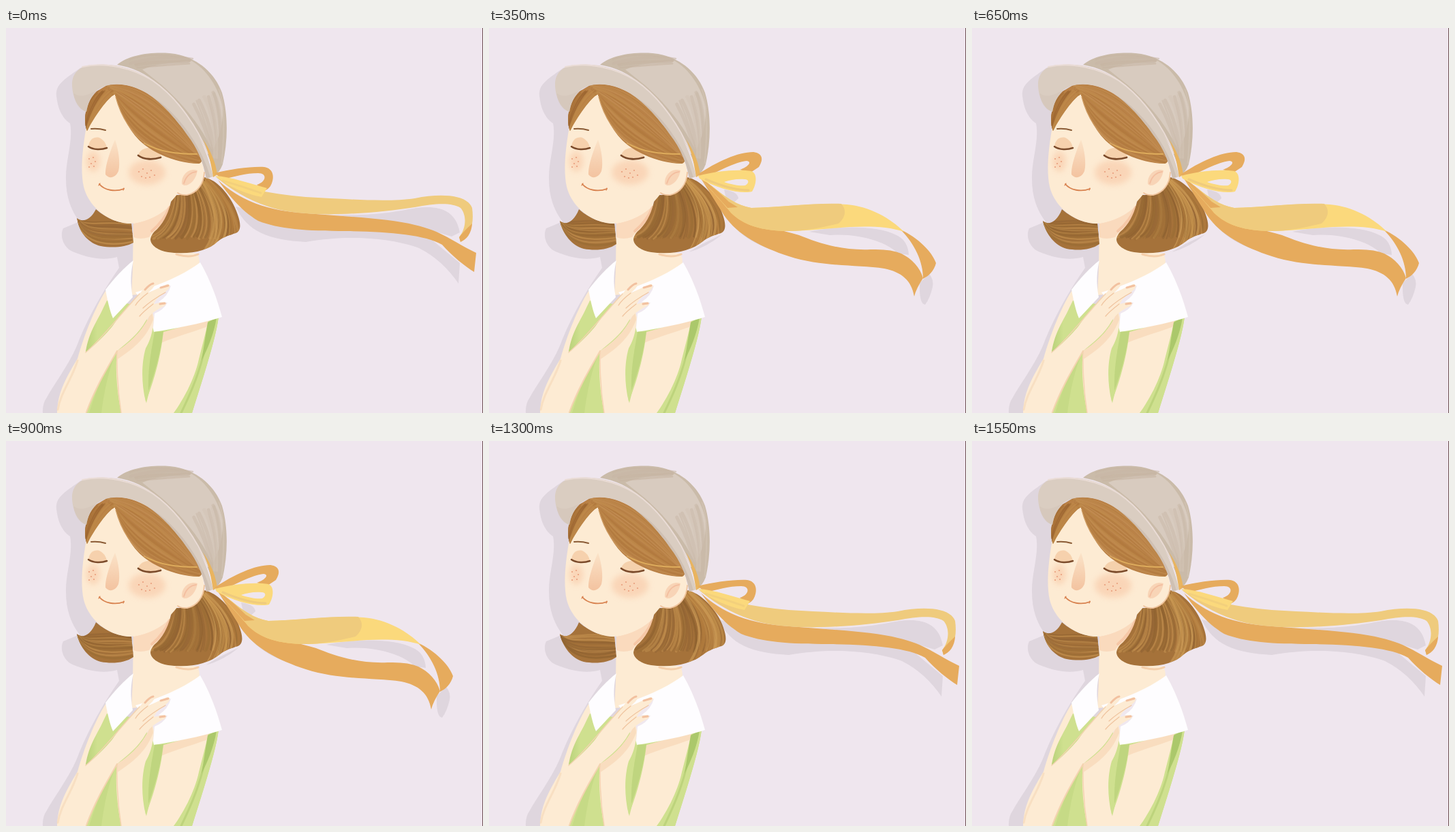
These frames come from a looping animation (700x565 px, 1600 ms). An HTML page:

```html
<!DOCTYPE html>
<html lang="en">
<head>
<meta charset="utf-8">
<title>Girl in the breeze</title>
<style>
html, body { margin: 0; width: 100%; height: 100%; overflow: hidden; background: #efe6ee; }
svg { display: block; width: 700px; height: 565px; }
.pose { display: none; }
</style>
</head>
<body>
<svg id="stage" viewBox="0 0 700 565"></svg>
<script>
const shape = (d, fill, extra = '') => `<path d="${d}" fill="${fill}" ${extra}/>`;
const line = (d, color, width = 1.5, extra = '') =>
  `<path d="${d}" fill="none" stroke="${color}" stroke-width="${width}" stroke-linecap="round" ${extra}/>`;
const blob = (x, y, rx, ry, fill, opacity = 1) =>
  `<ellipse cx="${x}" cy="${y}" rx="${rx}" ry="${ry}" fill="${fill}" opacity="${opacity}" filter="url(#soft)"/>`;

function random(seed) {
  return () => (seed = (seed * 16807) % 2147483647) / 2147483647;
}

// Brush strokes spread between two cubic curves.
function strands(count, a, b, colors, seed, width = 2.2) {
  const rnd = random(seed);
  let out = '';
  for (let i = 0; i < count; i++) {
    const k = (i + rnd()) / count;
    const p = a.map((v, j) => (v + (b[j] - v) * k + (rnd() - .5) * 4).toFixed(1));
    const color = colors[Math.floor(rnd() * colors.length)];
    out += line(`M${p[0]} ${p[1]}C${p.slice(2)}`, color, (width * (.5 + rnd())).toFixed(1), 'opacity=".55"');
  }
  return out;
}

function clipped(id, d, fill, inner) {
  return `<clipPath id="${id}"><path d="${d}"/></clipPath>` + shape(d, fill) +
    `<g clip-path="url(#${id})">${inner}</g>`;
}

const SKIN = '#fdebd3', PEACH = '#f5cfab', SHADE = '#dfd6de', LID = '#f4cda6';
const GREEN = '#cfe08f', LEAF = '#abc86b';
const ORANGE = '#e6ab5d', GOLD = '#efcb7d', YELLOW = '#fbd97c';
const BROWNS = ['#8b5f2f', '#c4914f', '#9c6d36', '#c99653', '#916333'];
const LIGHTS = ['#c8954f', '#d3a25c', '#b57f3f'];

const defs = `<defs>
  <filter id="soft" x="-50%" y="-50%" width="200%" height="200%"><feGaussianBlur stdDeviation="4"/></filter>
  <linearGradient id="nose" x1="0" y1="0" x2="0" y2="1">
    <stop offset="0" stop-color="#f3c29d" stop-opacity=".2"/><stop offset="1" stop-color="#f3c3a0"/>
  </linearGradient>
  <linearGradient id="green" x1="0" y1="0" x2="1" y2="0">
    <stop offset="0" stop-color="#b9d27a"/><stop offset=".4" stop-color="${GREEN}"/>
  </linearGradient>
</defs>`;

const backdrop =
  shape('M110 58C88 74 72 82 74 100C76 118 82 132 94 140C99 165 87 195 88 222C88 250 97 270 108 284L84 294C78 306 85 324 100 329C125 339 145 341 163 336L166 352C145 382 124 418 108 456C96 490 72 520 60 542Q53 552 54 565H130L200 420L230 120Z', SHADE);

const body =
  shape('M146 386C130 412 115 450 105 485C90 510 75 535 75 565H117L135 480L165 405Z', SKIN) +
  shape('M148 400L312 424C308 455 292 505 273 565H110Q114 520 117 474C124 450 136 425 148 400Z', GREEN) +
  shape('M148 402C137 425 121 445 117 476L160 440Z', 'url(#green)') +
  shape('M163 474C150 500 143 540 140 565H122C134 525 147 500 163 474Z', LEAF, 'opacity=".25"') +
  // shoulder arm and the forearm behind
  shape('M229 447L306 424C299 445 293 472 285 490C275 525 260 548 250 565H203C206 545 221 500 229 447Z', SKIN) +
  shape('M229 447L306 424L299 437C275 446 252 452 228 462Z', PEACH, 'opacity=".5"') +
  shape('M297 430L312 424C308 455 293 500 273 565H246C264 540 278 510 283 486C288 466 293 447 297 430Z', GREEN) +
  shape('M296 432L309 425C305 450 295 472 287 488Z', LEAF) +
  line('M290 478C282 512 268 542 257 565', LEAF, 3, 'opacity=".5"') +
  // neck and chest
  shape('M187 280L186 350L184 392L204 390L283 350C285 340 283 334 280 331L240 325L241 250Z', SKIN) +
  shape('M187 287C210 283 229 273 240 261L238 285C224 292 214 300 210 307Q196 311 187 307Z', '#fadabd') +
  line('M240 263C235 276 226 288 214 298', '#efaa82', 4, 'opacity=".4"') +
  line('M250 332Q269 338 282 332', PEACH, 3) +
  // collar
  shape('M187 341C174 351 158 368 146 384C149 400 152 414 157 426L186 395C182 374 183 358 187 341Z', '#fefdff') +
  shape('M285 344C300 370 310 398 317 424C290 433 255 440 217 446L208 410L190 388C225 377 258 364 285 344Z', '#fefdff') +
  shape('M209 388L242 378Q238 393 224 402L237 403Q231 414 218 419L216 440L207 430Z', '#f0e8ef') +
  // crossed forearms and hand
  shape('M163 474C185 460 205 440 214 413L217 425C216 440 214 450 210 460C201 485 199 520 205 547L210 565H169C163 535 160 500 163 474Z', SKIN) +
  shape('M163 474C185 460 205 440 214 413L216 428C205 458 184 472 164 486Z', PEACH, 'opacity=".5"') +
  shape('M216 446L231 445C228 480 216 522 205 548C198 520 199 490 205 470Q212 458 216 446Z', GREEN) +
  shape('M218 446L231 445C227 475 219 505 209 532C208 500 213 475 218 446Z', LEAF, 'opacity=".45"') +
  shape('M75 565C75 535 103 508 117 476C133 463 147 449 156 438C168 420 185 402 196 390C203 381 210 374 217 374C221 378 213 384 208 389L236 376C243 376 241 382 234 387C226 393 220 398 217 405L230 402C237 402 236 407 230 409C218 415 212 420 205 430C195 448 180 460 163 474C148 500 128 535 117 565Z', SKIN) +
  line('M105 488C97 515 80 535 76 560', '#f6d8b8', 3, 'opacity=".6"') +
  line('M163 474C148 500 130 530 118 564', '#f4d3b0', 2) +
  line('M117 476C137 460 168 420 196 390', '#f4d3b0', 1.5) +
  line('M163 474Q162 520 169 565', '#f4d3b0', 1.5) +
  line('M216 405C207 412 200 418 196 423M208 389C200 395 194 400 190 407M234 388Q214 399 201 411', '#f0c5a0', 1.3) +
  line('M204 384Q211 376 216 375M227 381L238 378M226 405L233 404', '#eeb08a', 3, 'opacity=".7"');

const bangs = 'M148 84C190 74 245 108 287 191C288 195 286 199 283 199C255 199 224 187 204 172C183 156 169 128 160 97C149 103 131 128 119 151C111 131 120 105 133 93Z';

const freckles = [[122, 192], [128, 190], [125, 199], [131, 196], [122, 204], [129, 203], [195, 211],
  [201, 207], [207, 213], [213, 209], [199, 218], [205, 220], [218, 216], [211, 219]]
  .map(([x, y]) => `<circle cx="${x}" cy="${y}" r="1.1" fill="#e99e7c"/>`).join('');

const head =
  shape('M150 90C130 105 119 125 117 150C112 180 109 210 114 233C121 262 150 286 182 287C213 285 236 264 252 243L290 205L270 150L200 90Z', SKIN) +
  // ear
  shape('M250 211C258 197 281 192 289 204C296 221 284 242 266 245Q252 245 249 236Z', SKIN) +
  line('M291 212C290 230 280 242 266 245Q257 246 252 242', '#f0c49d', 1.8) +
  shape('M258 229C257 214 270 205 281 209C279 222 270 232 261 231Z', '#f8d4b6') +
  line('M261 228C265 215 272 212 279 211', '#f3bfa0', 2) +
  // cheeks and eyelids
  blob(128, 196, 10, 15, '#f8c7a5', .6) + blob(207, 212, 27, 18, '#f8c7a5', .6) +
  shape('M121 174C122 163 130 159 137 161Q146 165 148 176C140 179 128 179 121 174Z', LID, 'opacity=".85"') +
  shape('M194 187C196 178 207 174 215 177Q226 181 228 190C217 193 203 194 194 187Z', LID, 'opacity=".85"') +
  shape('M160 164C165 178 168 198 165 210C161 220 151 222 146 215C145 203 153 180 160 164Z', 'url(#nose)') +
  freckles +
  line('M125 148Q136 147 146 150', '#8a5b35', 2) +
  line('M121 174C128 179 140 179 148 176', '#7b4b2b', 2.6) +
  line('M194 187C203 194 217 193 227 190', '#7b4b2b', 2.8) +
  line('M137 229C144 238 160 241 173 236', '#d8824f', 1.8) +
  line('M136 231l2 -3M172 238l1 -3', '#d8824f', 1.3) +
  clipped('fringe', bangs, '#b98045',
    strands(30, [149, 85, 195, 82, 245, 115, 286, 190], [158, 96, 168, 145, 210, 185, 282, 197],
      ['#ad7539', '#c6925a', '#bf8a4c', '#b37b40', '#c48f52'], 17, 3) +
    strands(9, [133, 94, 119, 107, 114, 130, 117, 150], [158, 93, 145, 102, 130, 124, 119, 148],
      ['#a36c33', '#bf8a4a', '#955f2c'], 29, 3)) +
  line('M203 169C225 182 251 185 280 185', '#dfad5d', 2) +
  line('M161 101C169 132 187 158 207 171', '#cd9a60', 1.2) +
  // hat
  shape('M163 54C180 40 210 35 240 37C275 40 305 62 317 95C326 125 326 165 318 200Q313 213 306 215C296 175 265 120 225 84C205 66 185 58 163 54Z', '#cabba9') +
  shape('M200 61C225 50 254 52 270 47C295 60 312 88 318 116C319 138 314 160 303 180C289 150 268 119 229 84Z', '#d8cbbf') +
  strands(9, [276, 110, 285, 130, 294, 155, 302, 184], [313, 90, 320, 110, 323, 140, 316, 197],
    ['#cabba9', '#d3c5b7', '#c8b8a6'], 41, 4) +
  strands(9, [180, 48, 205, 38, 240, 39, 272, 47], [194, 59, 220, 55, 245, 55, 268, 51],
    ['#cabba9', '#c6b5a3', '#d0c2b3'], 53, 3) +
  shape('M118 123C106 119 98 103 97 85C96 65 110 54 130 54C160 51 190 60 214 75C255 103 289 155 304 218L294 221C290 198 281 176 266 157C240 120 215 97 191 88C169 80 144 81 132 93C124 101 120 112 118 123Z', '#dacdc1') +
  shape('M118 123C106 119 101 109 99 95C111 105 121 96 132 93C124 101 120 112 118 123Z', '#cfc0b3', 'opacity=".4"') +
  shape('M191 88C240 108 283 162 300 219L294 221C290 198 281 176 266 157C240 120 215 97 191 88Z', '#c8b8aa', 'opacity=".6"') +
  line('M112 57C145 49 187 59 215 77C253 103 282 148 296 184', '#eadcd6', 2) +
  shape('M289 163C300 179 308 198 310 215L304 219C301 199 297 180 289 163Z', '#e9b45f');

function hair(id, right, tip, seed) {
  const r = n => n + right;
  const drop = tip - 279;
  const bob = `M290 219C311 222 ${r(332)} 249 ${r(340)} 274C${r(345)} 288 ${r(345)} 298 ${r(337)} 301C${r(328)} 304 ${r(320)} 306 ${r(311)} 313C296 328 268 333 238 329C224 327 212 319 212 310Q213 302 222 295C236 280 241 263 244 245C267 247 287 238 290 219Z`;
  const flick = `M104 ${tip}C112 ${tip + 7} 124 ${tip + 3} 132 266C149 281 168 287 184 287L187 ${315 + drop / 2}C175 ${322 + drop} 155 ${323 + drop} 139 ${320 + drop}C122 ${316 + drop} 108 302 104 ${tip}Z`;
  return clipped('flick' + id, flick, '#a5723a',
      strands(18, [105, tip, 120, 292, 145, 277, 185, 288], [106, 290, 118, 318, 150, 326, 186, 316], BROWNS, seed + 5)) +
    clipped('bob' + id, bob, '#a5723a',
      strands(42, [250, 240, 246, 275, 234, 300, 212, 308], [296, 221, r(325), 245, r(340), 278, r(340), 307],
        BROWNS, seed, 3) +
      strands(12, [288, 226, r(310), 265, r(310), 295, r(290), 326], [296, 221, r(330), 250, r(345), 280, r(338), 303],
        LIGHTS, seed + 11, 3));
}

const raised = {
  shade:
    shape('M337 262C354 299 385 311 440 314C510 302 570 310 606 323Q640 340 664 375L666 345L600 290L370 270Z', SHADE) +
    shape('M480 274C540 276 570 270 602 264C636 260 660 267 666 300L654 306L600 290L520 279Z', SHADE),
  cloth:
    shape('M311 223C345 255 385 267 430 271C500 277 560 279 600 289C640 298 655 313 690 330L687 358C674 350 655 335 640 318C615 303 560 299 500 298C440 298 400 295 370 283C345 268 328 247 311 223Z', ORANGE) +
    shape('M307 218C340 234 385 243 440 248C500 251 560 256 600 250C640 242 677 245 684 264C687 285 683 306 667 314L665 307C676 293 676 274 667 264C655 256 630 257 600 263C550 271 480 276 440 272C390 269 350 253 307 218Z', GOLD) +
    shape('M684 287C683 302 676 310 667 314L665 307Q671 299 684 287Z', ORANGE) +
    shape('M306 213C330 207 360 203 379 204C392 206 394 218 390 228Q387 236 379 239L368 230C382 226 384 213 370 213C352 213 336 218 318 222Z', ORANGE) +
    shape('M307 217C330 218 360 229 383 235L375 248C350 243 327 233 307 217Z', YELLOW) +
    line('M318 224Q345 232 374 242', GOLD, 3, 'opacity=".6"')
};

const lowered = {
  shade:
    shape('M340 262C360 304 395 323 440 331L500 332L370 285Z', SHADE) +
    shape('M470 299C510 290 570 289 598 304Q615 312 616 333L600 331C585 315 545 301 500 304Z', SHADE) +
    shape('M632 374L646 361Q653 369 651 380Q647 397 640 406Q631 405 632 374Z', SHADE) +
    shape('M345 237Q365 240 366 250L351 264Z', SHADE) +
    shape('M342 303Q319 322 293 329L313 317Z', SHADE),
  cloth:
    shape('M311 221C335 240 350 260 370 281C395 291 430 296 455 304C480 314 515 327 560 325Q590 324 605 331C625 341 634 356 637 367Q627 382 624 394C620 370 605 358 580 353C540 347 490 351 440 335C400 322 365 304 345 275Z', ORANGE) +
    shape('M604 296C630 308 650 328 656 345C653 357 645 364 637 368C637 343 625 317 604 296Z', ORANGE) +
    shape('M309 219C338 238 353 258 385 264C430 263 480 256 525 259C560 262 590 280 609 299C560 283 490 298 440 298C400 298 373 289 355 271C342 255 325 237 309 219Z', YELLOW) +
    shape('M309 219C338 238 353 258 385 264C430 263 480 256 517 258Q529 272 513 287C490 292 465 298 440 298C400 298 373 289 355 271C342 255 325 237 309 219Z', GOLD) +
    shape('M309 219C320 226 338 241 352 255L365 263L350 264Z', ORANGE) +
    shape('M306 215C335 196 365 182 388 182C402 184 403 193 396 204L384 212L368 208C380 204 387 196 378 195C360 197 335 211 314 221Z', ORANGE) +
    shape('M307 217C335 209 367 207 385 210C395 214 392 231 386 240C370 244 335 236 309 221ZM345 226C356 230 368 232 376 231C382 228 382 222 375 222C364 221 354 223 345 226Z', YELLOW, 'fill-rule="evenodd"') +
    line('M318 222C339 231 361 238 381 238', GOLD, 3)
};

const poses = [
  { right: 0, tip: 279, seed: 71, ribbon: raised },
  { right: 4, tip: 283, seed: 137, ribbon: raised },
  { right: 3, tip: 283, seed: 211, ribbon: lowered }
];
const layer = draw => poses.map((p, i) => `<g class="pose" data-pose="${i}">${draw(p, i)}</g>`).join('');

const stage = document.getElementById('stage');
stage.innerHTML = defs + backdrop +
  layer(p => p.ribbon.shade) + body +
  layer((p, i) => hair(i, p.right, p.tip, p.seed)) + head +
  layer(p => p.ribbon.cloth) +
  '<rect x="699" width="1" height="565" fill="#6d5054"/>';

// [start in ms, pose]
const steps = [[0, 0], [100, 2], [200, 1], [350, 2], [500, 0], [650, 2], [750, 1],
  [900, 2], [1050, 0], [1150, 2], [1300, 1], [1450, 2], [1550, 0]];
const layers = [...stage.querySelectorAll('.pose')];
let shown = -1;

function show() {
  const t = performance.now() % 1600;
  const pose = steps.filter(s => s[0] <= t).pop()[1];
  if (pose !== shown) {
    layers.forEach(g => g.style.display = +g.dataset.pose === pose ? 'inline' : 'none');
    shown = pose;
  }
  requestAnimationFrame(show);
}
show();
</script>
</body>
</html>
```
